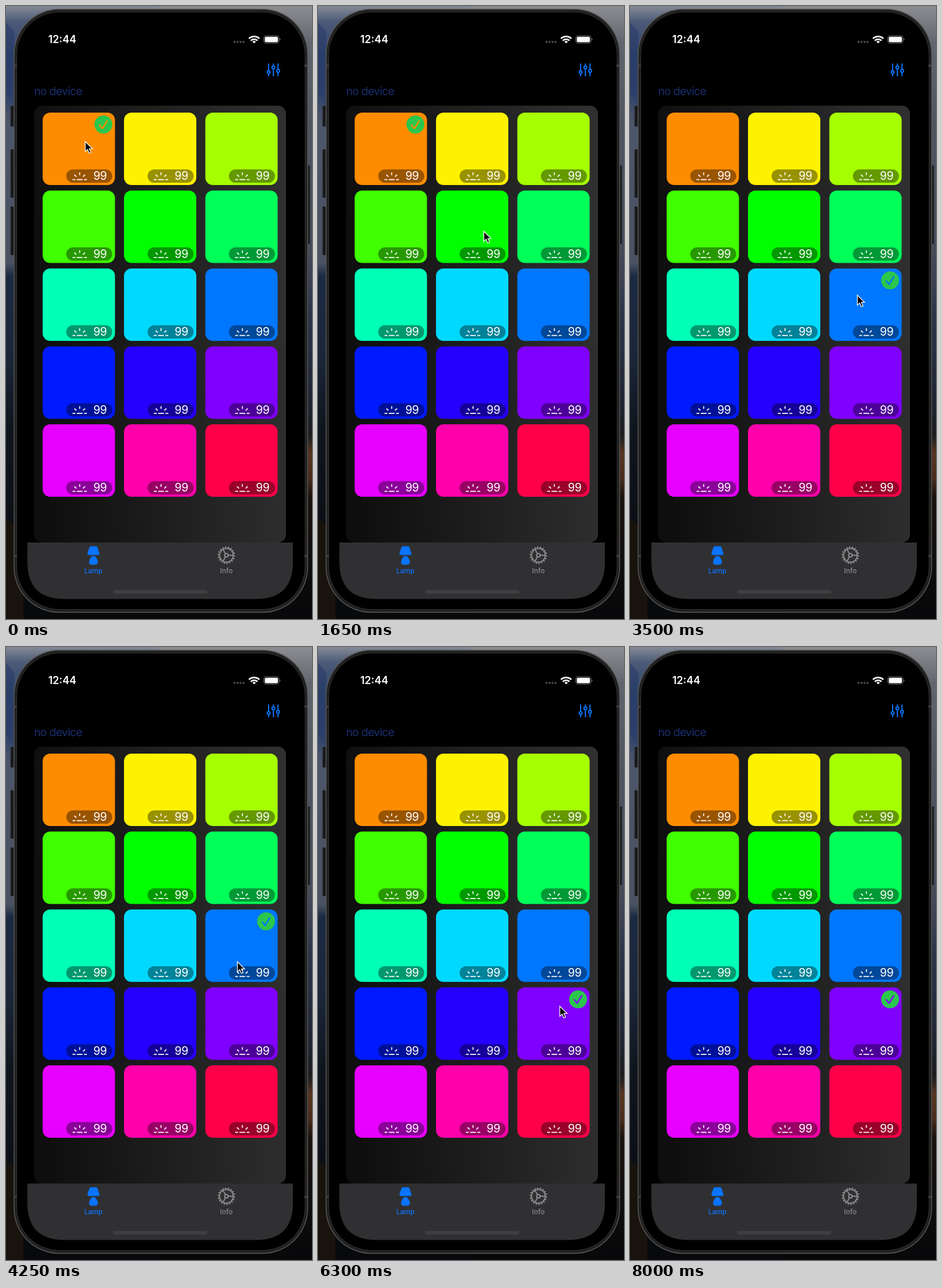
Recreate the animation shown at these times as an HTML page. Size 529x1058 px, loop 8.05 s.

```html
<!DOCTYPE html>
<html lang="en">
<head>
<meta charset="utf-8">
<title>Lamp colours</title>
<style>
  html, body { margin: 0; width: 100%; height: 100%; overflow: hidden; background: #000; }
  svg { display: block; width: 529px; height: 1058px; font-family: Inter, Roboto, sans-serif; }
</style>
</head>
<body>
<svg viewBox="0 0 529 1058">
  <defs>
    <linearGradient id="left" x2="0" y2="1">
      <stop offset="0" stop-color="#858a96"/>
      <stop offset=".025" stop-color="#4d5b78"/>
      <stop offset=".08" stop-color="#2d416a"/>
      <stop offset=".15" stop-color="#35466a"/>
      <stop offset=".19" stop-color="#4c566b"/>
      <stop offset=".42" stop-color="#4a5262"/>
      <stop offset=".44" stop-color="#1c2a43"/>
      <stop offset=".58" stop-color="#1a2538"/>
      <stop offset=".68" stop-color="#10161f"/>
      <stop offset="1" stop-color="#07090c"/>
    </linearGradient>
    <linearGradient id="right" x2="0" y2="1">
      <stop offset="0" stop-color="#8c8d91"/>
      <stop offset=".06" stop-color="#62656f"/>
      <stop offset=".2" stop-color="#50545f"/>
      <stop offset=".4" stop-color="#454b5a"/>
      <stop offset=".5" stop-color="#2b3449"/>
      <stop offset=".62" stop-color="#202838"/>
      <stop offset=".7" stop-color="#1b1c20"/>
      <stop offset=".73" stop-color="#57351f"/>
      <stop offset=".77" stop-color="#4a2c1b"/>
      <stop offset=".8" stop-color="#17110e"/>
      <stop offset="1" stop-color="#07080a"/>
    </linearGradient>
    <linearGradient id="panel" gradientUnits="userSpaceOnUse" x1="49" y1="560" x2="484" y2="535">
      <stop offset="0" stop-color="#0e0e0e"/>
      <stop offset="1" stop-color="#2f2f2f"/>
    </linearGradient>
    <g id="sun" fill="none" stroke="#fff" stroke-width="1.7" stroke-linecap="round">
      <path d="M52.3 115.6h3.6M59.7 115.6h8.6M72.2 115.6h3.6M64 103.8v3.4M55.2 107.6l2.6 2.5M72.8 107.6l-2.6 2.5"/>
    </g>
  </defs>

  <rect width="265" height="1058" fill="url(#left)"/>
  <rect x="264" width="265" height="1058" fill="url(#right)"/>
  <path d="M0 28L14 43V172L0 150Z" fill="#273c68" opacity=".6"/>
  <path d="M0 885L30 910V1058H0Z" fill="#19130e"/>

  <g fill="#191a1d" stroke="#44464a" stroke-width=".7">
    <rect x="7.8" y="172" width="8" height="36" rx="1.5"/>
    <rect x="7.8" y="247" width="8" height="84" rx="1.5"/>
    <rect x="7.8" y="346" width="8" height="84" rx="1.5"/>
    <rect x="518" y="275" width="7.5" height="136" rx="1.5"/>
  </g>
  <rect x="14" y="5.5" width="507.5" height="1041" rx="78" fill="#202020" stroke="#5a5a59" stroke-width="1.4"/>
  <rect x="18.5" y="10.5" width="498.5" height="1031" rx="74" fill="#000" stroke="#303030"/>
  <path d="M14 103h5M516 103h5M14 949h5M516 949h5" stroke="#3d3d3d" stroke-width="4"/>

  <text x="73" y="64" font-size="18" font-weight="600" fill="#fff">12:44</text>
  <g fill="#444">
    <circle cx="395" cy="62" r="2"/><circle cx="400.2" cy="62" r="2"/>
    <circle cx="405.4" cy="62" r="2"/><circle cx="410.6" cy="62" r="2"/>
  </g>
  <g fill="none" stroke="#fff" stroke-width="2.7">
    <path d="M420 56.3a12.8 12.8 0 0 1 18 0M423.2 59.7a8.2 8.2 0 0 1 11.6 0"/>
    <path d="M429 64.6l-3-3a4.3 4.3 0 0 1 6 0z" fill="#fff" stroke="none"/>
  </g>
  <rect x="445.6" y="51.2" width="26.4" height="13" rx="4" fill="none" stroke="#777"/>
  <rect x="447.4" y="53" width="22.8" height="9.4" rx="2.5" fill="#fff"/>
  <path d="M473.4 55.5q2.4 2.2 0 4.4z" fill="#777"/>

  <g fill="#000" stroke="#0a74ff" stroke-width="2" stroke-linecap="round">
    <path d="M454 100v20.5M462.2 100v20.5M470.3 100v20.5"/>
    <circle cx="454" cy="114" r="2.5"/><circle cx="462.2" cy="106" r="2.5"/><circle cx="470.3" cy="112" r="2.5"/>
  </g>
  <text x="48.5" y="154" font-size="19.2" letter-spacing="-.6" textLength="" fill="#1b2e70">no device</text>

  <rect x="48.5" y="172" width="435.5" height="754" rx="14" fill="url(#panel)"/>
  <g id="tiles"></g>

  <path d="M37 926H496V960Q496 1023.5 432 1023.5H101Q37 1023.5 37 960Z" fill="#303032"/>
  <rect x="185" y="1008" width="163" height="6" rx="3" fill="#3f3f41"/>
  <g fill="#0a74ff">
    <path d="M146.6 932.5h9.2q1.6 0 2.3 1.5l3.4 10.5q.7 3-2 3h-16.6q-2.700 0-2-3l3.400-10.500q.7-1.500 2.300-1.500z"/>
    <path d="M148 949.500h6.400q.3 2 2 3.500q2.400 3 2.400 6.500q0 4.700-4.300 4.700h-6.600q-4.300 0-4.300-4.700q0-3.500 2.400-6.500q1.700-1.500 2-3.500z"/>
    <text x="151" y="979" font-size="12" font-weight="500" text-anchor="middle">Lamp</text>
  </g>
  <g fill="none" stroke="#8b8b8d" stroke-width="2">
    <circle cx="381" cy="948" r="11.800"/>
    <circle cx="381" cy="948" r="13.800" stroke-width="2.600" pathLength="36" stroke-dasharray="1 1"/>
    <circle cx="381" cy="948" r="3"/>
    <path d="M384 948h8.500M379.500 945.400l-4.300-7.400M379.500 950.600l-4.300 7.400"/>
  </g>
  <text x="381" y="979" font-size="12" font-weight="500" text-anchor="middle" fill="#8b8b8d">Info</text>

  <g id="check">
    <circle cx="105" cy="20.500" r="15.500" fill="#2bc64d"/>
    <path id="tick" d="M98.500 21.500l4.700 6L111.300 14.500" fill="none" stroke-width="2.500" stroke-linecap="round" stroke-linejoin="round"/>
  </g>
  <path id="cursor" d="M0 0V17.200L4 13.500L6.800 20L9.800 18.800L7 12.400H12.400Z" fill="#000" stroke="#fff" stroke-width="1.300"/>
</svg>
<script>
const $ = id => document.getElementById(id);
const LOOP = 8050;
const colors = ['#ff8c00', '#fff200', '#a6ff00', '#40ff00', '#00ff00', '#00ff59', '#00ffb7', '#00d9ff',
  '#0077ff', '#001aff', '#2600ff', '#8000ff', '#e600ff', '#ff00aa', '#ff0048'];
const place = i => `translate(${63.4 + i % 3 * 140.6} ${184 + Math.floor(i / 3) * 134.5})`;

$('tiles').innerHTML = colors.map((color, i) => `<g transform="${place(i)}">
  <rect width="125" height="125" rx="13" fill="${color}"/>
  <rect x="40.800" y="98" width="79.500" height="23" rx="11.500" opacity=".4"/>
  <use href="#sun"/>
  <text x="99.200" y="116" font-size="19.500" letter-spacing="-.4" text-anchor="middle" fill="#fff">99</text>
</g>`).join('');

// Pointer path: time, x, y
const path = [[0, 137, 234], [1150, 137, 234], [2050, 393, 499], [3900, 393, 499],
  [4800, 414, 630], [5200, 414, 630], [5600, 418, 620], [6900, 418, 620], [7600, 545, 700], [LOOP, 545, 700]];
// Selected tile: start time, index
const picks = [[0, 0], [2650, 8], [5750, 11]];

function draw(now) {
  const t = now % LOOP;
  const k = path.findIndex(p => p[0] > t);
  const [t0, x0, y0] = path[k - 1], [t1, x1, y1] = path[k];
  const u = (t - t0) / (t1 - t0), e = u * u * (3 - 2 * u);
  $('cursor').setAttribute('transform', `translate(${x0 + (x1 - x0) * e} ${y0 + (y1 - y0) * e})`);

  const pick = picks.filter(p => p[0] <= t).pop()[1];
  $('check').setAttribute('transform', place(pick));
  $('tick').setAttribute('stroke', colors[pick]);
}

const start = performance.now();
function tick() {
  draw(performance.now() - start);
  requestAnimationFrame(tick);
}
tick();
</script>
</body>
</html>
```
